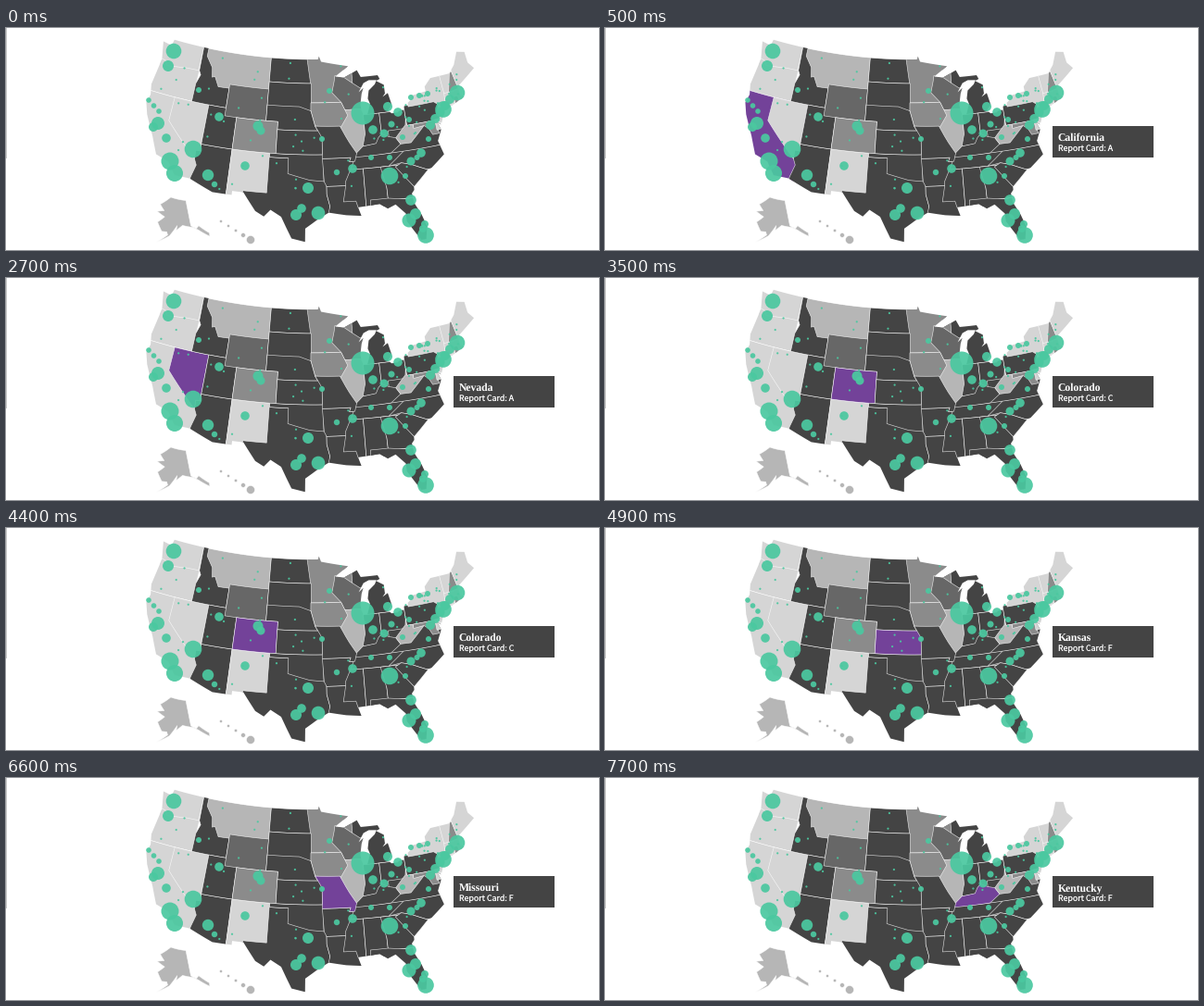
Animation, 640 px wide and 240 px high, one loop 8 s. Source, as a matplotlib script:

```python
import numpy as np
import matplotlib.pyplot as plt
from matplotlib.animation import FuncAnimation
from matplotlib.patches import Circle, Polygon, Rectangle

plt.rcParams["text.hinting"] = "none"
W, H, DPI = 640, 240, 100
PX = 72 / DPI
SHADES = dict(A="#d5d5d5", B="#b6b6b6", C="#8b8b8b", D="#676767", F="#444444")
PURPLE, GREEN = "#734299", "#4bc8a0"

# Conic equal-area views: parallels, meridian, scale, anchor lon/lat, anchor pixel
MAIN = (29.5, 45.5, 96, 490, 96.6, 38.7, 328.1, 122.3)
ALASKA = (55, 65, 154, 171.5, 156, 58.5, 177.3, 221.1)

fig = plt.figure(figsize=(W / DPI, H / DPI), dpi=DPI, facecolor="white")
ax = fig.add_axes([0, 0, 1, 1], xlim=(0, W), ylim=(H, 0))
ax.axis("off")
shapes = {}


def project(lon, lat, view):
    p1, p2, meridian, scale, lon0, lat0, x0, y0 = view
    s1, s2 = np.sin(np.radians([p1, p2]))
    n = (s1 + s2) / 2

    def conic(lo, la):
        rho = np.sqrt(1 + s1 * s2 - 2 * n * np.sin(np.radians(la))) / n
        angle = n * np.radians(meridian - lo)
        return rho * np.sin(angle), rho * np.cos(angle)

    (x, y), (ax0, ay0) = conic(lon, lat), conic(lon0, lat0)
    return x0 + scale * (x - ax0), y0 + scale * (y - ay0)


def outline(coords, view=MAIN):
    """Close a west-longitude/latitude ring and bend its long edges."""
    pts = np.reshape(coords, (-1, 2)).astype(float)
    parts = []
    for a, b in zip(pts, np.roll(pts, -1, axis=0)):
        steps = max(1, int(np.abs(b - a).max()))
        parts.append(a + (b - a) * np.arange(steps)[:, None] / steps)
    lon, lat = np.vstack(parts).T
    return np.column_stack(project(lon, lat, view))


NORTH = [124.7, 48.4, 123, 48.2, 122.8, 49, 95.2, 49, 95, 49.4, 94.6, 48.7, 89.6, 48,
         92.1, 46.75, 90.4, 46.6, 88, 47.4, 87.4, 46.5, 84.3, 46.5, 84, 46, 84.7, 45.8,
         83.4, 45.2, 83.4, 44.1, 83.9, 43.7, 82.9, 44.1, 82.5, 42.6, 83.3, 41.9,
         82.7, 41.5, 81.7, 41.5, 78.9, 42.9, 79, 43.3, 76.3, 43.5, 76.3, 44.1, 75, 45,
         71.5, 45, 70.3, 45.9, 69.2, 47.4, 67.8, 47.1, 67.8, 45.7, 67, 44.8]
ATLANTIC = [70.7, 43.1, 70.6, 41.9, 70, 41.7, 73.9, 40.6, 74.9, 39, 75.5, 39.4,
            75.1, 38.4, 76, 37.1, 75.5, 35.3, 77.9, 33.9, 79.2, 33.2, 81.4, 31.2,
            81.3, 30, 80.5, 28.4, 80, 26.8, 80.4, 25.2]
GULF = [81.1, 25.2, 82.7, 27.8, 82.7, 28.8, 84, 30.1, 85.2, 29.7, 86.3, 30.4, 89.5, 30.2,
        89.1, 29.1, 91.3, 29.3, 93.8, 29.7, 95.2, 29, 97.2, 27.7, 97.2, 26, 99.1, 26.4,
        100.7, 29.1, 102.3, 29.9, 103.2, 29, 104.5, 29.6, 106.5, 31.8, 108.2, 31.8,
        108.2, 31.3, 111.1, 31.3, 114.8, 32.5]
PACIFIC = [117.1, 32.5, 118.5, 34, 120.6, 34.5, 121.9, 36.6, 123.7, 39, 124.4, 40.4,
           124.1, 41.5, 124.5, 42.8, 124, 46.2]
country = Polygon(outline(NORTH + ATLANTIC + GULF + PACIFIC), fc="none", ec="none")
ax.add_patch(country)


def add_shape(name, grade, patch):
    patch.set(facecolor=SHADES[grade], edgecolor=(1, 1, 1, 0.8), linewidth=0.6 * PX)
    ax.add_patch(patch)
    shapes.setdefault(name, []).append((patch, SHADES[grade]))


def state(name, grade, *coords):
    """Add a state, cut to the coast; later states cover earlier ones."""
    patch = Polygon(outline(coords), zorder=1)
    add_shape(name, grade, patch)
    patch.set_clip_path(country)


def box(name, grade, west, east, south, north):
    state(name, grade, west, north, east, north, east, south, west, south)


# West
box("Washington", "A", 125, 117.03, 45.5, 49.5)
state("Oregon", "A", 125, 46.25, 123.4, 46.2, 122.7, 45.6, 119.3, 45.95, 116.9, 46,
      117, 42, 125, 42)
box("California", "A", 125, 114, 32, 42)
state("Nevada", "A", 120, 42, 114.04, 42, 114.04, 36.1, 114.7, 36.1, 114.63, 35, 120, 39)
state("Arizona", "F", 114.04, 37, 109.05, 37, 109.05, 31, 114.8, 31, 114.7, 32.7,
      114.2, 34.3, 114.63, 35, 114.7, 36.1, 114.04, 36.1)
box("Montana", "B", 116.2, 104.05, 44.4, 49)
state("Idaho", "F", 117.03, 49.2, 116.05, 49.2, 116.05, 48, 114.7, 46.7, 114.4, 45.5,
      113.9, 45.65, 113, 44.45, 111.05, 44.5, 111.05, 42, 117.03, 42, 117.03, 44.3,
      116.5, 45.5, 116.9, 46)
box("Utah", "F", 114.04, 109.05, 37, 42)
box("Wyoming", "D", 111.05, 104.05, 41, 45)
box("New Mexico", "A", 109.05, 103, 31, 37)

# Plains and lakes
box("Michigan", "F", 90.5, 82, 41.73, 48)
box("Minnesota", "C", 97.3, 89, 43.5, 49.5)
state("Wisconsin", "D", 92.1, 46.9, 90.4, 46.57, 87.65, 45.1, 86.8, 45.3, 87, 42.5,
      90.64, 42.5, 91.22, 43.5, 92.75, 44.75, 92.3, 46.1)
state("North Dakota", "F", 104.05, 49, 97.23, 49, 96.56, 45.94, 104.05, 45.94)
box("South Dakota", "F", 104.05, 96.45, 42.5, 45.94)
box("Illinois", "B", 91.5, 87.53, 36.9, 42.5)
state("Iowa", "C", 96.5, 43.5, 91.22, 43.5, 90.2, 41.8, 91.42, 40.4, 95.77, 40.58, 96.5, 42.5)
state("Nebraska", "F", 104.05, 43, 98.5, 43, 96.5, 42.5, 95.77, 40.58, 95.3, 40, 102.05, 40,
      102.05, 41, 104.05, 41)
box("Colorado", "C", 109.05, 102.05, 37, 41)
state("Texas", "F", 103.05, 36.5, 94.04, 36.5, 94.04, 32, 93.6, 30.5, 93.8, 29, 93, 25,
      107, 25, 106.6, 32, 103.05, 32)
state("Oklahoma", "F", 103, 37, 94.5, 37, 94.45, 33.64, 96.6, 33.8, 100, 34.56,
      100, 36.5, 103, 36.5)
box("Kansas", "F", 102.05, 94.61, 37, 40)

# South and east
state("Indiana", "F", 87.53, 41.73, 84.82, 41.73, 84.82, 38, 88.05, 37.8, 87.53, 39.3)
box("Ohio", "F", 84.82, 80.52, 38.4, 41.73)
box("Virginia", "F", 83.7, 75, 36.55, 39.4)
box("Tennessee", "F", 90.3, 81.7, 35, 36.6)
state("Kentucky", "F", 82.6, 38.4, 83.7, 38.65, 84.82, 39.1, 85.4, 38.7, 85.9, 38,
      88.05, 37.8, 89.2, 37, 89.5, 36.5, 83.68, 36.6, 81.97, 37.54)
box("Mississippi", "F", 91.7, 88.3, 30, 35)
box("Alabama", "F", 88.3, 85, 30, 35)
state("Arkansas", "F", 94.62, 36.5, 90.1, 36.5, 90.37, 36, 89.7, 36, 91.15, 33.5,
      91.15, 33, 94.04, 33, 94.4, 33.6)
state("Louisiana", "F", 94.04, 33, 91.15, 33, 91.6, 31, 89.75, 31, 89.5, 30.2, 88.5, 29,
      94, 29, 93.6, 30.5, 94.04, 32)
state("Missouri", "F", 95.77, 40.58, 91.6, 40.5, 90.75, 39.2, 90.2, 38.4, 89.13, 37,
      89.5, 36, 90.37, 36, 90.1, 36.5, 94.62, 36.5, 94.62, 39.1, 95.3, 40)
state("Georgia", "F", 85.6, 35, 83.1, 35, 80.9, 32, 81, 30.7, 85, 30.7, 85, 32.3)
state("Florida", "F", 87.6, 31, 85, 31, 82.2, 30.6, 81.2, 30.7, 79, 25, 88, 25)
state("North Carolina", "F", 84.3, 35, 81.68, 36.6, 75, 36.55, 75, 34, 78.55, 33.86,
      80.8, 34.8, 82.3, 35.2)
state("South Carolina", "F", 83.3, 34.8, 82.3, 35.2, 80.8, 34.8, 78.4, 33.8, 80.9, 32)
box("Pennsylvania", "F", 80.52, 74.8, 39.72, 42.2)
state("West Virginia", "B", 80.52, 40.64, 80.75, 39.8, 82.6, 38.4, 81.97, 37.54,
      80.3, 37.5, 77.72, 39.32, 79.48, 39.3, 79.48, 39.72, 80.52, 39.72)
state("Maryland", "C", 79.48, 39.72, 75.79, 39.72, 75.5, 38, 76.6, 38, 77.04, 38.85,
      77.72, 39.32, 79.48, 39.2)
box("Delaware", "A", 75.79, 74.9, 38.45, 39.8)
box("Massachusetts", "A", 73.5, 69.5, 41.4, 42.8)
box("Connecticut", "A", 73.5, 71.8, 41, 42.05)
box("Rhode Island", "C", 71.8, 71.1, 41, 42.02)
box("Vermont", "A", 73.4, 71.5, 42.73, 45.1)
state("New Hampshire", "C", 72.45, 42.73, 70.6, 42.9, 71.08, 45.3, 71.5, 45)
state("Maine", "A", 71.08, 45.3, 70.7, 43, 66, 43, 66, 48, 71, 48)
state("New York", "A", 79.76, 42.5, 80, 43.5, 75, 45.2, 73.34, 45.2, 73.27, 42.75,
      73.5, 41.1, 71.8, 41.1, 74, 40.5, 73.9, 41, 75.35, 42, 79.76, 42)
state("New Jersey", "A", 74.7, 41.36, 73.8, 41, 73.8, 38.8, 75.5, 39.5, 74.75, 40.2,
      75.1, 40.9)

LAKE = [87.5, 41.7, 86.8, 41.76, 86.2, 43, 86.5, 43.7, 86.2, 44.7, 85, 45.4, 84.6, 45.9,
        86, 46, 87, 45.7, 88, 44.6, 87.1, 45.1, 87.5, 44.4, 87.9, 43, 87.8, 42.3]
ax.add_patch(Polygon(outline(LAKE), fc="white", ec="none", zorder=2))

MAINLAND = [141, 69.65, 141, 60.3, 137.5, 58.9, 135.5, 59.7, 130.1, 56, 130.6, 54.8,
            136.6, 58.3, 139.8, 59.6, 147, 60.9, 151.8, 59.3, 151, 61, 156.5, 57.3,
            164.5, 54.6, 157.7, 57.6, 158.5, 58.7, 162, 58.7, 166, 61.8, 161, 64,
            168, 65.6, 162, 66.2, 166.5, 68.3, 156.6, 71.3]
add_shape("Alaska", "B", Polygon(outline(MAINLAND, ALASKA)))
for t in np.linspace(0, 1, 5):
    add_shape("Hawaii", "B", Circle((264 - 32 * t, 229 - 20 * t), 1.5 + 3 * (1 - t) ** 4))


def bubble(x, y, r):
    ax.add_patch(Circle((x, y), r, fc=GREEN, ec="none", alpha=0.93, zorder=3))


# Largest cities: x, y, radius
CITIES = [(181, 25, 8.3), (175, 41, 6), (164, 103, 7), (159, 107, 5), (173, 119, 4.8),
          (177, 144, 9.5), (182, 157, 9), (202, 131, 9.3), (218, 159, 6.2), (225, 169, 3.2),
          (230, 96, 4.8), (208, 67, 3), (272, 106, 5.5), (275, 111, 4.5), (258, 149, 4.8),
          (326, 173, 6), (319, 195, 4.8), (313, 202, 6), (337, 200, 7.3), (341, 120, 3),
          (357, 156, 3.2), (374, 152, 4.8), (349, 68, 3), (385, 92, 12.5), (396, 110, 4.8),
          (408, 114, 4.5), (416, 104, 3.5), (423, 91, 4.8), (412, 85, 5), (414, 160, 9.3),
          (437, 144, 4.5), (448, 135, 4.8), (472, 88, 8.8), (487, 70, 8.3),
          (437, 186, 5.8), (442, 201, 6), (435, 208, 7.5), (453, 224, 8.8)]
for city in CITIES:
    bubble(*city)


def trail(start, end, count, radius):
    """Evenly spaced bubbles along a corridor of towns."""
    for x, y in np.linspace(start, end, count):
        bubble(x, y, radius)


trail((458, 105), (479, 77), 5, 5)
trail((437, 75), (455, 71), 3, 3)
trail((154, 78), (165, 90), 3, 2.8)
trail((394, 140), (414, 140), 2, 3)
trail((431, 160), (456, 120), 3, 3)
trail((428, 118), (435, 99), 2, 3)
trail((452, 212), (450, 217), 2, 4)

# Small towns: thin over the whole land, dense in the northeast
rng = np.random.default_rng(4)
land = country.get_path()
for low, high, count in (((165, 20), (460, 180), 55), ((445, 50), (490, 85), 16)):
    towns = rng.uniform(low, high, (3 * count, 2))
    for x, y in towns[land.contains_points(towns)][:count]:
        bubble(x, y, 1.1)

# Page edge
ax.add_patch(Rectangle((0, 0), 1, 141, fc="#c8c8c8", lw=0))

tooltip = Rectangle((483, 106), 109, 34, fc="#444444", lw=0, zorder=4)
ax.add_patch(tooltip)
title = ax.text(488.6, 122, "", color="white", size=11.6 * PX, weight="bold",
                family="Liberation Serif", va="baseline", zorder=5)
report = ax.text(488.6, 133, "", color="white", size=8.8 * PX,
                 family="Noto Sans CJK JP", va="baseline", zorder=5)

# Hover start (ms), state, grade
HOVERS = [(0, None, ""), (400, "California", "A"), (2500, "Nevada", "A"),
          (2900, "Utah", "F"), (3500, "Colorado", "C"), (4500, "Kansas", "F"),
          (5300, "Missouri", "F"), (7300, "Kentucky", "F")]
STEP, LOOP = 100, 8000


def update(frame):
    _, hovered, grade = [h for h in HOVERS if h[0] <= frame * STEP][-1]
    for name, parts in shapes.items():
        for patch, shade in parts:
            patch.set_facecolor(PURPLE if name == hovered else shade)
    for artist in (tooltip, title, report):
        artist.set_visible(hovered is not None)
    title.set_text(hovered or "")
    report.set_text(f"Report Card: {grade}")
    return []


anim = FuncAnimation(fig, update, frames=LOOP // STEP, interval=STEP,
                     repeat=True, repeat_delay=0, blit=False)
plt.show()
```
